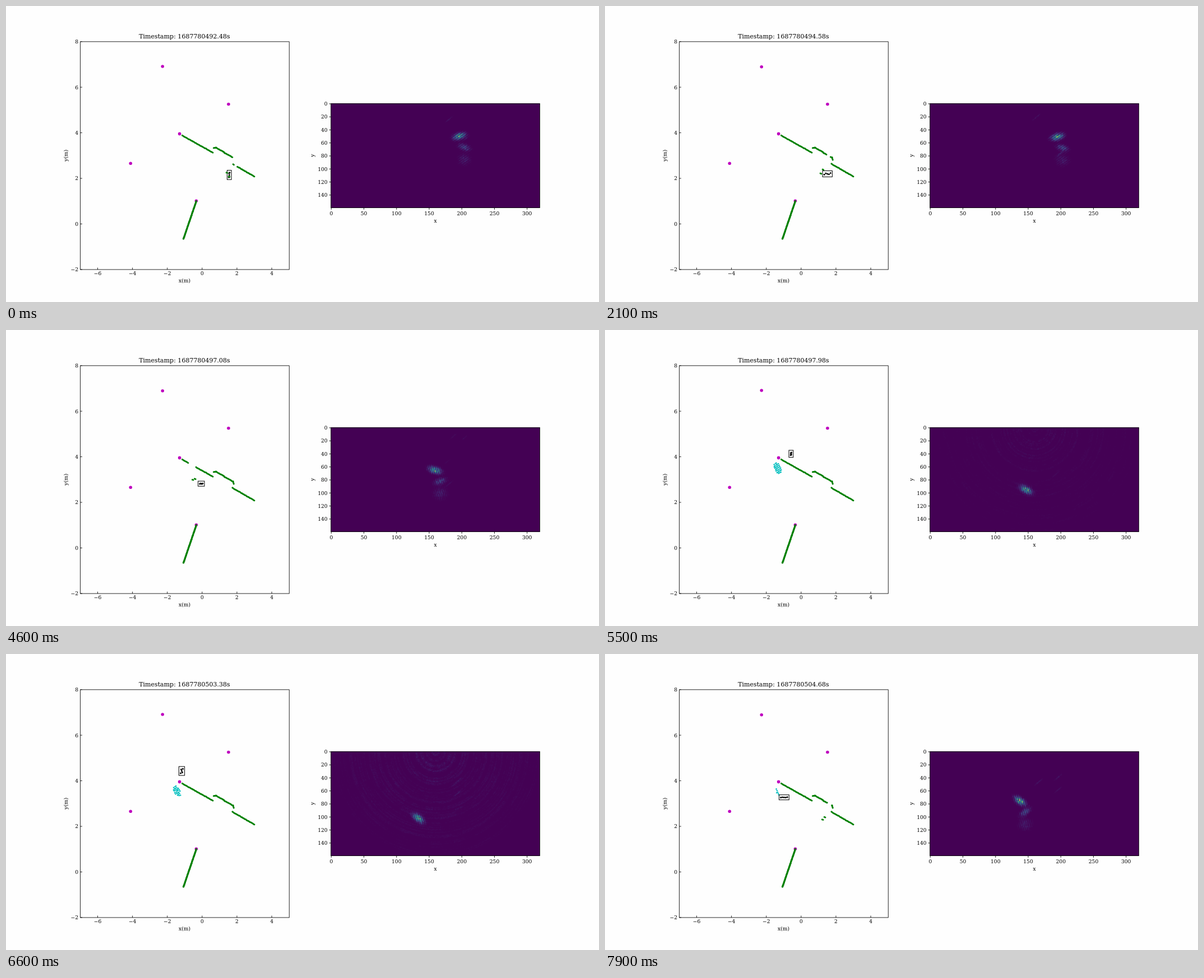
Write an HTML page with a canvas that moves like this. It is 1058x529 px and loops after 8 s.

```html
<!DOCTYPE html>
<html lang="en">
<head>
<meta charset="utf-8">
<title>Lidar and radar tracking</title>
<style>
html, body { margin: 0; width: 100%; height: 100%; overflow: hidden; background: #fefefe; }
canvas { display: block; }
</style>
</head>
<body>
<canvas id="stage" width="1058" height="529"></canvas>
<script>
const ctx = document.getElementById('stage').getContext('2d');
const LOOP = 8000, STEP = 100;
const GREEN = '#008000', CYAN = '#00bfbf', MAGENTA = '#bf00bf';
const RAD = Math.PI / 180;
const mapX = v => 349.9 + v * 31.06;
const mapY = v => 389.5 - v * 40.73;
const clamp = (v, lo, hi) => Math.min(hi, Math.max(lo, v));
const wave = (t, period) => Math.cos(2 * Math.PI * t / period);

// ---------- helpers ----------
function hash(a, b = 0, c = 0) {
  let n = Math.imul(a | 0, 374761393) + Math.imul(b | 0, 668265263) + Math.imul(c | 0, 1274126177);
  n = Math.imul(n ^ (n >>> 13), 1274126177);
  return ((n ^ (n >>> 16)) >>> 0) / 4294967296;
}
const wobble = (a, b, c) => hash(a, b, c) * 2 - 1;

function dot(x, y, r, color) {
  ctx.fillStyle = color;
  ctx.beginPath();
  ctx.arc(x, y, r, 0, Math.PI * 2);
  ctx.fill();
}
function text(s, x, y, size = 9.18, align = 'center') {
  ctx.fillStyle = '#000';
  ctx.font = size + 'px "DejaVu Serif", serif';
  ctx.textAlign = align;
  ctx.fillText(s, x, y);
}
function upright(s, x, y) {
  ctx.save();
  ctx.translate(x, y);
  ctx.rotate(-Math.PI / 2);
  text(s, 0, 0);
  ctx.restore();
}
function line(x1, y1, x2, y2) {
  ctx.beginPath();
  ctx.moveTo(x1, y1);
  ctx.lineTo(x2, y2);
  ctx.stroke();
}
function box(x1, y1, x2, y2, width) {
  ctx.strokeStyle = '#000';
  ctx.lineWidth = width;
  ctx.strokeRect(x1, y1, x2 - x1, y2 - y1);
}
const label = v => String(v).replace('-', '\u2212');

// ---------- axes ----------
function drawMapAxes(step) {
  box(132.6, 63.8, 505.3, 471, 0.85);
  for (let v = -6; v <= 4; v += 2) {
    line(mapX(v), 471, mapX(v), 467.6);
    text(label(v), mapX(v), 481.4);
  }
  for (let v = -2; v <= 8; v += 2) {
    line(132.6, mapY(v), 135.9, mapY(v));
    text(label(v), 129, mapY(v) + 3.4, 9.18, 'right');
  }
  text('x(m)', 318.6, 494.3);
  upright('y(m)', 109.5, 267.2);
  const stamp = 1687780492.48 + step * 0.1 + (step >= 66 ? 4.3 : 0);
  text('Timestamp: ' + stamp.toFixed(2) + 's', 318.4, 58.3, 11.02);
}
function drawImageAxes() {
  const scale = 372.7 / 320;
  box(579.7, 174.3, 952.4, 360.6, 0.85);
  for (let v = 0; v <= 300; v += 50) {
    const x = 580.3 + v * scale;
    line(x, 360.6, x, 363.9);
    text(v, x, 374.3);
  }
  for (let v = 0; v <= 140; v += 20) {
    const y = 174.8 + v * scale;
    line(576.4, y, 579.7, y);
    text(v, 573.7, y + 3.4, 9.18, 'right');
  }
  text('x', 766, 387);
  upright('y', 549.6, 267.2);
}

// ---------- person ----------
// Walk in metres: stands, crosses to the left, turns behind the wall, comes back
const WALK = [
  { t: 0, x: 1.56, y: 2.15 }, { t: 2100, x: 1.51, y: 2.2 }, { t: 4600, x: -0.05, y: 2.82 },
  { t: 6100, x: -1.38, y: 3.52 }, { t: 7100, x: -1.5, y: 3.56 }, { t: 8300, x: -0.72, y: 3.13 }
];
function walk(t) {
  const i = clamp(WALK.findIndex(k => k.t > t), 1, WALK.length - 1);
  const a = WALK[i - 1], b = WALK[i], k = (t - a.t) / (b.t - a.t);
  return { x: a.x + (b.x - a.x) * k, y: a.y + (b.y - a.y) * k };
}
const isHidden = t => t >= 5500 && t < 7600;

// Behind the wall the radar sees the person mirrored upwards
function detect(t) {
  const p = walk(t);
  return isHidden(t) ? { x: p.x + 0.27, y: p.y + 0.89 } : p;
}
function drawDetection(t, step) {
  const p = detect(t), x = mapX(p.x), y = mapY(p.y);
  const rx = 3.6 - 2.9 * wave(t, 5700), ry = 2.3 + 1.9 * wave(t, 3150);
  for (let i = 0; i < 5; i++) {
    dot(x + rx * (i / 2 - 1), y + ry * Math.cos(i * 135 * RAD), 1.5, '#000');
  }
  box(x - rx - 3.1, y - ry - 4.1, x + rx + 3.1, y + ry + 4.1, 1);
}
function legs(t) {
  const p = walk(t + 400), swing = 3.5 * wave(t, 1400);
  return [-1, 1].map(side => ({ x: mapX(p.x) - 2 + side * 2, y: mapY(p.y) + side * swing }));
}
function drawLegs(t) {
  if (isHidden(t)) return;
  for (const { x, y } of legs(t)) {
    dot(x - 0.8, y - 0.4, 1.5, GREEN);
    dot(x + 0.8, y + 0.3, 1.5, GREEN);
  }
}

// Cloud of reflected points: a slanted lattice cut to an ellipse
function drawEcho(t, step) {
  if (t < 5500) return;
  const p = walk(t), cx = Math.min(mapX(p.x), 308), cy = Math.min(mapY(p.y), 247);
  const long = isHidden(t) ? 11 : 7, short = clamp(6 - (t - 6100) / 450, 2, 6);
  const c = Math.cos(62 * RAD), s = Math.sin(62 * RAD);
  for (let r = -6; r <= 6; r++) {
    for (let i = -6; i <= 6; i++) {
      const x = r * 1.3 + i * 1.9 + wobble(r, i, step) * 0.4;
      const y = r * 2.7 - i * 1.3 + wobble(r, i, step + 500) * 0.4;
      if (Math.hypot((x * c + y * s) / long, (y * c - x * s) / short) < 1) dot(cx + x, cy + y, 1.3, CYAN);
    }
  }
}

// ---------- lidar map ----------
const WALLS = [
  [[314.5, 231.3], [369, 262]],
  [[370.5, 254], [374.5, 253], [388, 260.5], [390, 262.6], [405, 270.7], [406.3, 274.8]],
  [[404, 282], [443, 304.6]]
];
const POST = [[339.5, 348.8], [316.6, 416.3]];
const bearing = (x, y) => Math.atan2(x - mapX(0), mapY(0) - y) / RAD;

function drawWall(wall, radius, shadows) {
  for (let i = 1; i < wall.length; i++) {
    const [x1, y1] = wall[i - 1], [x2, y2] = wall[i];
    const n = Math.ceil(Math.hypot(x2 - x1, y2 - y1) / 1.5);
    for (let k = 0; k <= n; k++) {
      const x = x1 + (x2 - x1) * k / n, y = y1 + (y2 - y1) * k / n;
      if (shadows.some(a => Math.abs(bearing(x, y) - a) < 1.2)) continue;
      dot(x, y + wobble(k, i, 9) * 0.35, radius, GREEN);
    }
  }
}
function drawWalls(t) {
  const shadows = isHidden(t) ? [] : legs(t).map(leg => bearing(leg.x, leg.y));
  WALLS.forEach(wall => drawWall(wall, 1.5, shadows));
  drawWall(POST, 1.7, []);
}
function drawBeacons(step) {
  const beacons = [[279.3, step % 11 ? 108.7 : 108], [397, 175.5], [309.7, 228.4], [222.3, 281.3], [339.5, 348.3]];
  beacons.forEach(([x, y]) => dot(x, y, 2.8, MAGENTA));
}

// ---------- radar image ----------
const VIRIDIS = [[68, 1, 84], [65, 68, 135], [42, 120, 142], [34, 168, 132], [122, 209, 81], [253, 231, 37]];
const W = 320, H = 160, CELLS = 23; // cells per metre
const heat = document.createElement('canvas');
heat.width = W;
heat.height = H;
const heatCtx = heat.getContext('2d');
const pixels = heatCtx.createImageData(W, H);
const field = new Float32Array(W * H);

function addBlob(x, y, len, wide, tilt, grain, power, step) {
  const c = Math.cos(tilt * RAD), s = Math.sin(tilt * RAD);
  const gx = -Math.sin(grain * RAD), gy = Math.cos(grain * RAD), reach = Math.max(len, wide) * 3;
  for (let j = Math.max(0, Math.floor(y - reach)); j < Math.min(H, y + reach); j++) {
    for (let i = Math.max(0, Math.floor(x - reach)); i < Math.min(W, x + reach); i++) {
      const dx = i - x, dy = j - y;
      const u = (dx * c + dy * s) / len, v = (dy * c - dx * s) / wide;
      const stripe = 0.3 + 0.7 * Math.pow(0.5 + 0.5 * Math.cos((dx * gx + dy * gy) * 2.1), 1.5);
      const speck = 0.4 + 0.8 * hash(i, j >> 1, step);
      field[j * W + i] += power * Math.exp(-(u * u + v * v) * 0.65) * stripe * speck;
    }
  }
}
function addPerson(t, step) {
  const p = detect(t), x = W / 2 + p.x * CELLS, y = p.y * CELLS;
  const tilt = 15 - 20 * p.x, grain = 75 - 110 * clamp(p.x, 0, 1);
  addBlob(x, y, 7, 3.6, tilt, grain, 1, step);
  if (isHidden(t)) return;
  addBlob(x + 8, y + 17, 7, 3.5, -tilt, grain, 0.38, step);
  addBlob(x + 8, y + 36, 8, 7, 0, grain, 0.15, step);
}
function addClutter(step) {
  for (let k = 0; k < 4; k++) {
    addBlob(185 + wobble(k, step, 3) * 25, 10 + hash(k, step, 4) * 80, 6, 1.5, -40, -40, hash(k, step, 5) * 0.14, step);
  }
}
function addRings(t, step) {
  const level = 0.17 * Math.exp(-(((t - 6100) / 500) ** 2)) + 0.02 * hash(step, 6);
  for (let j = 0; j < H; j++) {
    for (let i = 0; i < W; i++) {
      const dx = i - W / 2, r = Math.hypot(dx, j);
      if (r > 160) continue;
      const ring = hash(Math.floor(r / 1.6), 7, step);
      const sector = 0.5 + 0.5 * hash(Math.floor(Math.atan2(j, dx) * 8), Math.floor(r / 6), step);
      field[j * W + i] += level * ring * sector * (0.3 + hash(i, j, step)) * (1.15 - r / 220);
    }
  }
}
function drawRadar(t, step) {
  field.fill(0);
  addPerson(t, step);
  addClutter(step);
  addRings(t, step);
  field.forEach((value, p) => {
    const v = clamp(value - 0.015, 0, 0.999) * 5;
    const i = Math.floor(v), a = VIRIDIS[i], b = VIRIDIS[i + 1];
    for (let ch = 0; ch < 3; ch++) pixels.data[p * 4 + ch] = a[ch] + (b[ch] - a[ch]) * (v - i);
    pixels.data[p * 4 + 3] = 255;
  });
  heatCtx.putImageData(pixels, 0, 0);
  ctx.drawImage(heat, 579.7, 174.3, 372.7, 186.3);
}

// ---------- loop ----------
function draw(step) {
  const t = step * STEP;
  ctx.fillStyle = '#fefefe';
  ctx.fillRect(0, 0, 1058, 529);
  drawBeacons(step);
  drawWalls(t);
  drawEcho(t, step);
  drawDetection(t, step);
  drawLegs(t);
  drawMapAxes(step);
  drawRadar(t, step);
  drawImageAxes();
}
let shown = -1;
const start = performance.now();
function tick() {
  const step = Math.floor(((performance.now() - start) % LOOP) / STEP);
  if (step !== shown) draw(shown = step);
  requestAnimationFrame(tick);
}
tick();
</script>
</body>
</html>
```
